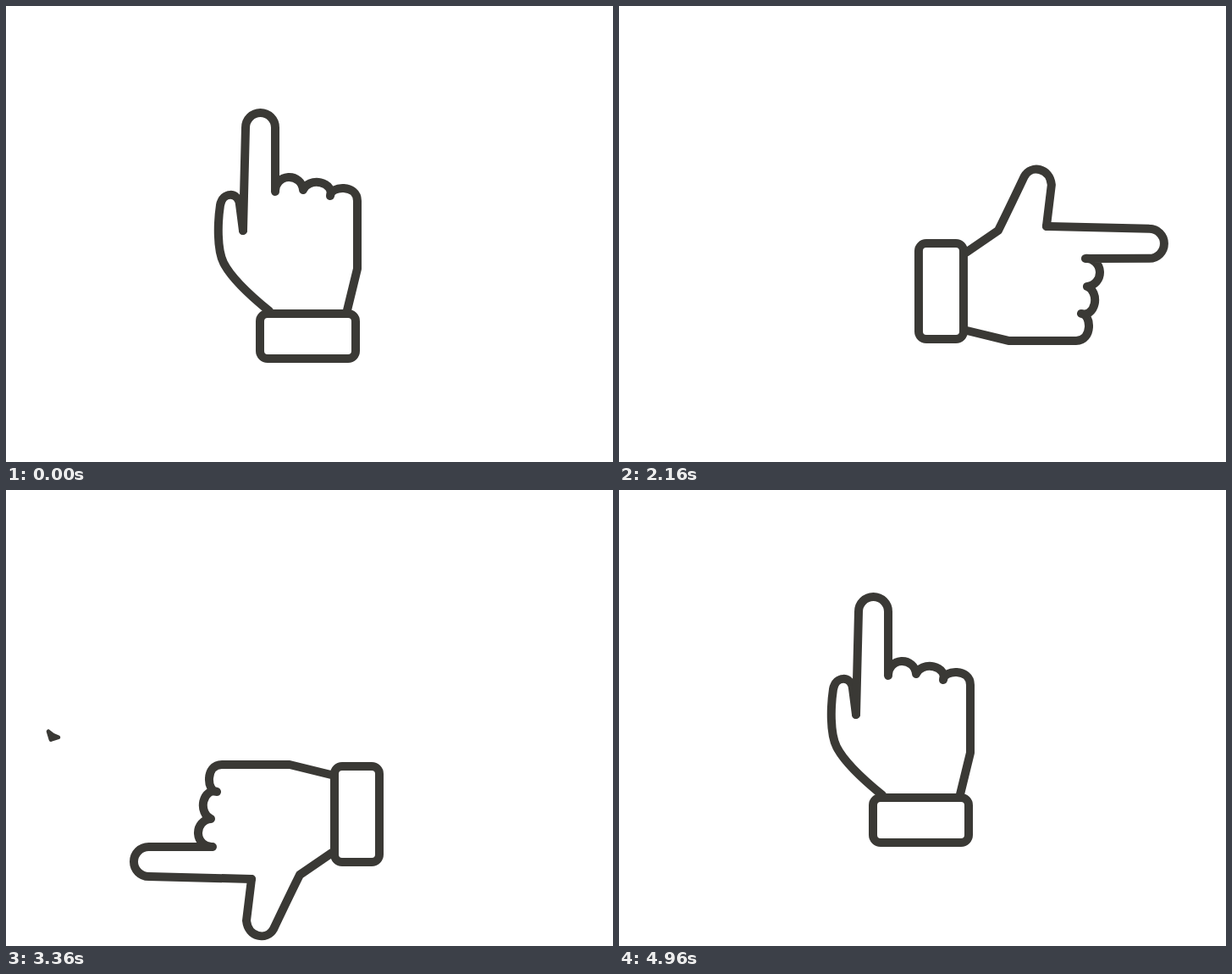
An HTML page that plays this animation: 717 px wide and 538 px high, repeating every 5000 ms.

```html
<!DOCTYPE html>
<html lang="en">
<head>
<meta charset="utf-8">
<title>Pointing hand</title>
<style>
  html, body { margin: 0; width: 100%; height: 100%; overflow: hidden; background: #fff; }
  svg { display: block; width: 100%; height: 100%; }
  path, rect { fill: none; stroke: #3a3935; stroke-width: 10; stroke-linecap: round; stroke-linejoin: round; }
  .shaft { stroke-width: 14; }
  .head { fill: #3a3935; stroke-width: 11; }
</style>
</head>
<body>
<svg viewBox="0 0 717 538">
  <g id="hand">
    <path id="thumb"/>
    <path d="M280 265L283 143.5A17.5 17.5 0 0 1 318 143.5V219A16.5 16 0 0 1 351 217A16.4 12.5 0 0 1 383 224C383 212 415 210 415 230V310L403 359"/>
    <rect x="300" y="363" width="113" height="53" rx="9"/>
  </g>
  <g id="right">
    <path class="shaft" d="M319 45C440 47 600 90 667 230"/>
    <path class="head" d="M-6 0L-20 -16Q-18 0 -24 15Z"/>
  </g>
  <g id="left">
    <path class="shaft" d="M417 110C270 105 110 150 52 297"/>
    <path class="head" d="M-6 0L-20 -16Q-18 0 -24 15Z"/>
  </g>
</svg>
<script>
const LOOP = 5000, PIVOT = [357, 332];
const el = id => document.getElementById(id);
const hand = el('hand'), thumb = el('thumb');

// Thumb outline from wrist to index finger, folded and spread
const FOLDED = [311,360, 295,347, 267,323, 257,303, 249,287, 250,255, 253,235, 256,219, 274,219, 276,234, 280,265];
const SPREAD = [311,360, 302,347, 294,335, 285,322, 263,311, 242,301, 221,291, 207,283, 211,261, 231,259, 280,265];

function ease(t, from, to) {
  const u = Math.min(1, Math.max(0, (t - from) / (to - from)));
  return (1 - Math.cos(Math.PI * u)) / 2;
}

function drawThumb(open) {
  const p = FOLDED.map((v, i) => v + (SPREAD[i] - v) * open);
  thumb.setAttribute('d', `M${p.slice(0, 2)}C${p.slice(2, 20)}L${p.slice(20)}`);
}

function drawHand(t) {
  const backRight = ease(t, 2155, 2600);
  const right = ease(t, 320, 680) - backRight;
  const left = ease(t, 3000, 3360) - ease(t, 4555, 4950);
  const lift = t < 1500 ? 16.5 : 23;
  let x = 122 * ease(t, 320, 740) - 41 * ease(t, 740, 880) - 81 * backRight;
  let y = 5 * right - lift * Math.sin(Math.PI * right);
  y += 50 * (ease(t, 3000, 3360) - ease(t, 3360, 3800));
  if (t > 4000) x -= 24 * Math.sin(Math.PI * left);
  hand.setAttribute('transform', `translate(${x} ${y}) rotate(${90 * (right - left)} ${PIVOT})`);
  drawThumb(Math.min(1, 1.35 * Math.max(right, left)));
}

function makeArrow(id, headFrom, headTo, tailFrom, tailTo) {
  const group = el(id), [shaft, head] = group.children;
  const length = shaft.getTotalLength();
  return t => {
    const visible = t >= headFrom && t < tailTo;
    group.style.display = visible ? '' : 'none';
    if (!visible) return;
    const tip = Math.max(24, length * ease(t, headFrom, headTo));
    const tail = length * ease(t, tailFrom, tailTo);
    const body = tip - 18 - tail;
    shaft.style.display = body > 0 && tip > 25 ? '' : 'none';
    shaft.style.strokeDasharray = `0 ${tail} ${Math.max(0, body)} ${length * 2}`;
    const a = shaft.getPointAtLength(tip - 14), b = shaft.getPointAtLength(tip);
    const angle = Math.atan2(b.y - a.y, b.x - a.x) * 180 / Math.PI;
    const size = tail > 0 ? Math.min(1, (length - tail) / 32) : 1;
    head.setAttribute('transform', `translate(${b.x} ${b.y}) rotate(${angle}) scale(${size})`);
  };
}

const arrows = [
  makeArrow('right', 396, 856, 600, 1040),
  makeArrow('left', 2740, 3180, 2980, 3410)
];

function frame() {
  const t = performance.now() % LOOP;
  drawHand(t);
  arrows.forEach(draw => draw(t));
  requestAnimationFrame(frame);
}
frame();
</script>
</body>
</html>
```
